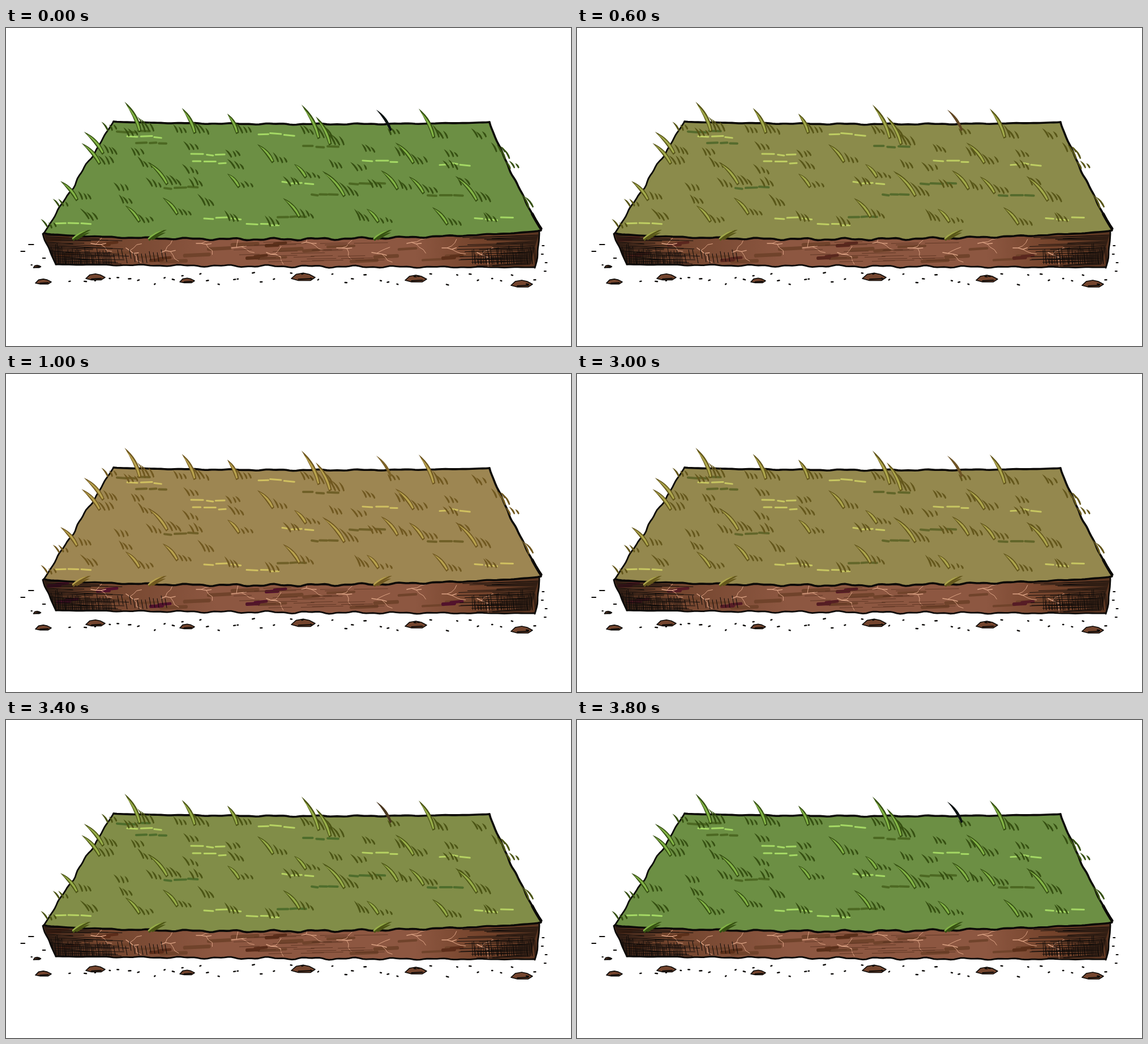
An HTML page with a canvas for the animation above (6800 ms loop, 998x561 px).

```html
<!DOCTYPE html>
<html lang="en">
<head>
<meta charset="utf-8">
<title>Grass patch</title>
<style>
html, body { margin: 0; width: 100%; height: 100%; overflow: hidden; background: #fff; }
canvas { display: block; width: 100%; height: 100%; }
</style>
</head>
<body>
<canvas id="stage" width="998" height="561"></canvas>
<script>
const ctx = document.getElementById('stage').getContext('2d');
const LOOP = 6800, STEP = 200, REVIVE = 3000;
const INK = '#0c0a08';

// Each colour runs fresh -> halfway -> dry.
const tones = {
  ground: [[108, 143, 68], [134, 140, 73], [157, 134, 82]],
  dark: [[54, 80, 18], [82, 86, 22], [112, 88, 32]],
  mid: [[130, 180, 70], [156, 172, 74], [184, 162, 78]],
  light: [[164, 216, 100], [186, 208, 98], [208, 192, 96]],
  shade: [[76, 104, 34], [78, 110, 46], [112, 96, 40]],
  black: [[12, 18, 18], [90, 64, 34], [124, 98, 40]],
  clod: [[92, 48, 26], [92, 44, 26], [82, 18, 44]]
};

// Key points: tall blades also carry a height, stones a width.
const blades = [
  [237, 183, 53], [334, 186, 45], [409, 186, 35], [553, 195, 60], [573, 206, 50], [756, 194, 52],
  [172, 222, 39], [166, 240, 37], [126, 304, 34], [285, 276, 40], [303, 329, 30], [472, 237, 32],
  [598, 297, 45], [692, 285, 34], [720, 239, 37], [832, 305, 44], [519, 334, 34], [412, 281, 24],
  [236, 342, 29], [658, 343, 24], [780, 347, 31], [738, 292, 30], [530, 264, 24]
];
const glints = [[214, 191], [446, 187], [327, 223], [330, 237], [88, 345], [350, 336],
  [425, 347], [488, 273], [630, 235], [766, 240], [828, 336]];
const shadows = [[196, 183], [230, 204], [280, 282], [525, 209], [607, 274], [540, 293], [480, 333], [745, 296]];
const clods = [[162, 383], [256, 410], [426, 406], [460, 384], [772, 406], [75, 374], [92, 402]];
const stones = [[66, 448, 28], [158, 440, 34], [320, 446, 26], [525, 440, 42], [724, 443, 38], [911, 452, 38], [55, 421, 13]];

const back = wavy([190, 165], [854, 166], 4, 0.8);
const right = wavy([854, 166], [945, 354], 4, 0.8);
const front = wavy([945, 357], [67, 362], -13, 1.5);
const left = wavy([67, 362], [190, 165], 0, 1.5);
const sideRight = wavy([942, 358], [934, 423], -2, 0.8);
const base = wavy([934, 422], [88, 417], -1, 1.5);
const sideLeft = wavy([88, 417], [65, 363], -1, 1);

let seed;
function rand(lo = 0, hi = 1) {
  seed = (seed * 1664525 + 1013904223) >>> 0;
  return lo + (hi - lo) * seed / 4294967296;
}

// A hand-drawn edge from a to b: a shallow arch plus small ripples.
function wavy([ax, ay], [bx, by], arch, ripple) {
  const dx = bx - ax, dy = by - ay, len = Math.hypot(dx, dy);
  const count = Math.ceil(len / 6), list = [];
  for (let i = 0; i <= count; i++) {
    const u = i / count, s = u * len;
    const off = arch * Math.max(0, Math.sin(Math.PI * u)) ** 0.6
      + ripple * Math.sin(Math.PI * u) * (Math.sin(s / 12) + 0.6 * Math.sin(s / 5 + 1));
    list.push([ax + dx * u - dy / len * off, ay + dy * u + dx / len * off]);
  }
  return list;
}

function tone(stops, k) {
  const i = k < 0.5 ? 0 : 1, f = k * 2 - i;
  return `rgb(${stops[i].map((v, n) => Math.round(v + (stops[i + 1][n] - v) * f))})`;
}

function area(edges, fill) {
  ctx.beginPath();
  edges.flat().forEach(p => ctx.lineTo(...p));
  ctx.closePath();
  ctx.fillStyle = fill;
  ctx.fill();
}

function stroke(list, width, color = INK) {
  ctx.beginPath();
  list.forEach(p => ctx.lineTo(...p));
  ctx.lineWidth = width;
  ctx.strokeStyle = color;
  ctx.stroke();
}

const dash = (x, y, dx, dy, width, color) => stroke([[x, y], [x + dx, y + dy]], width, color);

// A tapered blade rooted at x, y whose tip is dx, dy away.
function leaf(x, y, dx, dy, w, color) {
  const len = Math.hypot(dx, dy), side = Math.sign(-dx);
  const nx = -dy / len * side, ny = dx / len * side;
  const at = off => [x + dx / 2 + nx * off, y + dy / 2 + ny * off];
  const bend = len * 0.13;
  ctx.beginPath();
  ctx.moveTo(x - nx * w * 0.3, y - ny * w * 0.3);
  ctx.quadraticCurveTo(...at(bend - w * 0.6), x + dx, y + dy);
  ctx.quadraticCurveTo(...at(bend + w * 0.6), x + nx * w * 0.3, y + ny * w * 0.3);
  ctx.fillStyle = color;
  ctx.fill();
}

function blade(x, y, dx, dy, w, c) {
  leaf(x, y, dx, dy, w, c.dark);
  leaf(x - 1, y - 2, dx * 0.85, dy * 0.85, w * 0.5, c.mid);
}

function tuft(x, y, count, h, color) {
  for (let i = 0; i < count; i++) {
    const s = h * (1 - i * 0.18) * rand(0.8, 1.1);
    leaf(x + i * 7.5, y + rand(-2, 2), -s * rand(0.5, 0.85), -s, 4, color);
  }
}

// Short strokes trailing to the right.
function streak([x, y], width, color) {
  for (let i = 0; i < 3; i++) {
    const len = rand(10, 22);
    dash(x, y + rand(-2, 2), len, rand(-1, 2), width, color);
    x += len + rand(3, 7);
  }
}

function root(x, y, angle, depth) {
  const list = [[x, y]];
  for (let i = 0; i < 3; i++) {
    const a = angle + rand(-0.6, 0.6);
    x += Math.cos(a) * 9;
    y += Math.sin(a) * 7;
    list.push([x, y]);
    if (depth && i < 2) root(x, y, angle + (i ? 0.8 : -0.8), depth - 1);
  }
  stroke(list, 1 + depth * 0.4, '#dda384');
}

// Crossed pen lines, densest at the outer end; dir points inwards.
function hatch(x, dir) {
  for (let i = 0; i < 30; i++) {
    dash(x + dir * i * 0.5, 365 + i * 1.8, dir * rand(40, 140), rand(0, 6), 0.9, INK);
  }
  for (let i = 0; i < 42; i++) {
    const top = rand(378, 394) + i * 0.3;
    dash(x + dir * (6 + i * 2.7), top, rand(0, 4), 416 - top, 0.9, INK);
  }
}

function soil(c) {
  const fill = ctx.createLinearGradient(65, 0, 942, 0);
  [[0, '#51301f'], [0.1, '#70432c'], [0.35, '#8d5741'],
    [0.75, '#8d5741'], [0.88, '#74432b'], [1, '#583420']].forEach(s => fill.addColorStop(...s));
  ctx.save();
  area([front, sideLeft.slice().reverse(), base.slice().reverse(), sideRight.slice().reverse()], fill);
  ctx.clip();
  for (let x = 190; x < 860; x += 42) dash(x, rand(380, 416), rand(25, 55), -2, rand(4, 7), '#70432b');
  for (const [x, y] of clods) {
    dash(x, y, 20, -1, 6, c.clod);
    dash(x + 14, y - 3, 20, -2, 5, c.clod);
  }
  for (let i = 0; i < 12; i++) root(150 + i * 62, 380 + i % 3 * 8, i % 2 ? 0.25 : -0.1, 1);
  for (let i = 0; i < 28; i++) dash(rand(400, 620), rand(377, 413), rand(25, 65), -1, 0.7, '#4f2b1b');
  for (let i = 0; i < 14; i++) dash(190 + i * 7, rand(390, 400), 3, 16, 1, INK);
  hatch(68, 1);
  hatch(940, -1);
  ctx.restore();
}

function debris() {
  for (const [x, y, w] of stones) {
    const h = w * 0.13;
    area([[[x - w / 2, y + 2], [x - w * 0.3, y - h], [x, y - h * 1.4], [x + w * 0.25, y - h],
      [x + w / 2, y], [x + w * 0.3, y + h], [x - w * 0.2, y + h]]], '#74452e');
    ctx.strokeStyle = INK;
    ctx.lineWidth = 1.6;
    ctx.stroke();
    dash(x - w * 0.2, y + h * 0.6, w * 0.5, -1, 2, INK);
  }
  for (let i = 0; i < 42; i++) dash(115 + i * 20 + rand(-8, 8), rand(432, 453), rand(1, 4), rand(-1, 1), 2.4, INK);
  for (let i = 0; i < 4; i++) {
    dash(rand(24, 66), 382 + i * 12, rand(1, 9), 0, 2, INK);
    dash(rand(945, 953), 384 + i * 15, 3, 0, 2, INK);
  }
}

function grass(c) {
  for (const p of shadows) streak(p, 4, c.shade);
  for (const p of glints) streak(p, 3, c.light);
  for (let row = 0; row < 6; row++) {
    const y = 190 + row * 31, inset = (354 - y) * 0.6;
    for (let x = 110 + inset + row % 2 * 40; x < 910 - inset * 0.6; x += 78) {
      const px = x + rand(-18, 18), py = y + rand(-7, 7);
      const crowded = blades.some(b => Math.hypot(b[0] + 12 - px, b[1] - py) < 32);
      if (!crowded) tuft(px, py, 3, 15 + row, c.dark);
    }
  }
  for (const u of [0.06, 0.24, 0.92]) tuft(...left[Math.floor(u * left.length)], 3, 15, c.dark);
  for (const u of [0.35, 0.8]) tuft(...right[Math.floor(u * right.length)], 2, 24, c.dark);
  for (const [x, y, h] of blades) {
    tuft(x + 9, y, 3, h * 0.5, c.dark);
    blade(x, y, -h * (y < 210 ? 0.52 : 0.88), -h, 9, c);
  }
  for (const x of [118, 252, 650]) {
    blade(x + 6, 373, 24, -12, 6, c);
    blade(x, 374, 32, -18, 7, c);
  }
  leaf(680, 181, -26, -37, 6, c.black);
}

function draw(k) {
  const c = {};
  for (const name in tones) c[name] = tone(tones[name], k);
  seed = 71;
  ctx.fillStyle = '#fff';
  ctx.fillRect(0, 0, 998, 561);
  ctx.lineCap = ctx.lineJoin = 'round';
  debris();
  soil(c);
  area([back, right, front, left], c.ground);
  for (const e of [back, right, front]) stroke(e, 3.6);
  for (const e of [left, sideRight, base, sideLeft]) stroke(e, 2.8);
  stroke(right.slice(-6), 5);
  grass(c);
}

// Dries out in five hard steps, rests, then recovers the same way.
function dryness(t) {
  return t < REVIVE
    ? Math.min(5, Math.floor(t / STEP)) / 5
    : Math.max(0, 4 - Math.floor((t - REVIVE) / STEP)) / 5;
}

let shown = -1;
const start = performance.now();
function tick() {
  const k = dryness((performance.now() - start) % LOOP);
  if (k !== shown) draw(shown = k);
  requestAnimationFrame(tick);
}
tick();
</script>
</body>
</html>
```
